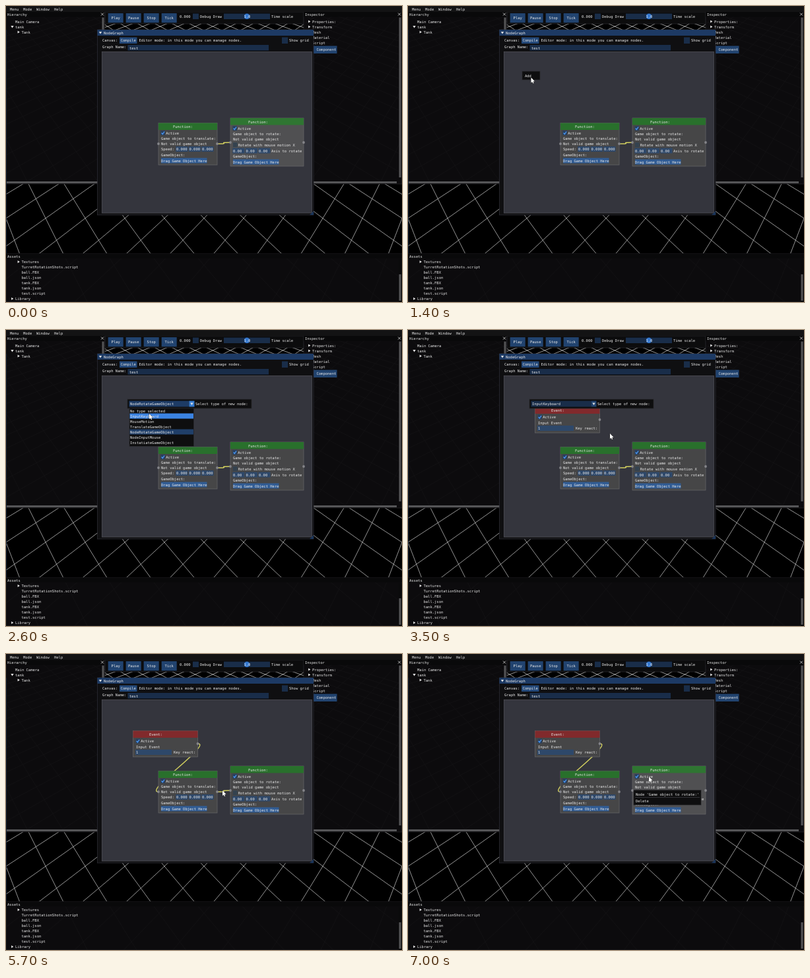
Write an HTML page with a canvas that moves like this. It is 600x449 px and loops after 7100 ms.

```html
<!DOCTYPE html>
<html lang="en">
<head>
<meta charset="utf-8">
<title>Node graph editor</title>
<style>
  html, body { margin: 0; width: 100%; height: 100%; overflow: hidden; background: #000; }
  canvas { display: block; width: 600px; height: 449px; }
</style>
</head>
<body>
<canvas id="stage"></canvas>
<script>
const W = 600, H = 449, LOOP = 7100, STEP = 100;
const BLUE = '#21436f', FIELD = '#192d49', LINK = '#d2d05f', SCROLL = '#555557';
const canvas = document.getElementById('stage');
const dpr = window.devicePixelRatio || 1;
canvas.width = W * dpr;
canvas.height = H * dpr;
const screen = canvas.getContext('2d');
let ctx = screen;

function box(x1, y1, x2, y2, fill, edge) {
  ctx.fillStyle = fill;
  ctx.fillRect(x1, y1, x2 - x1, y2 - y1);
  if (edge) {
    ctx.strokeStyle = edge;
    ctx.lineWidth = 0.7;
    ctx.strokeRect(x1, y1, x2 - x1, y2 - y1);
  }
}

// y is the vertical middle of the capitals
function text(str, x, y, color = '#e8e8e8') {
  ctx.fillStyle = color;
  ctx.fillText(str, x, y + 2);
}

function poly(points, fill) {
  ctx.beginPath();
  for (const [x, y] of points) ctx.lineTo(x, y);
  ctx.closePath();
  ctx.fillStyle = fill;
  ctx.fill();
}

function stroke(points, color, width) {
  ctx.beginPath();
  for (const [x, y] of points) ctx.lineTo(x, y);
  ctx.strokeStyle = color;
  ctx.lineWidth = width;
  ctx.stroke();
}

function disc(x, y, r, fill) {
  ctx.beginPath();
  ctx.arc(x, y, r, 0, 2 * Math.PI);
  ctx.fillStyle = fill;
  ctx.fill();
}

const arrowRight = (x, y) => poly([[x - 1.4, y - 2], [x + 1.9, y], [x - 1.4, y + 2]], '#e4e4e4');
const arrowDown = (x, y) => poly([[x - 2.2, y - 1.5], [x + 2.2, y - 1.5], [x, y + 2]], '#e4e4e4');

function tree(x, y, label, arrow) {
  if (arrow) arrow(x - 4.5, y);
  text(label, x, y);
}

function cross(x, y) {
  stroke([[x - 2, y - 2], [x + 2, y + 2]], '#ddd', 0.8);
  stroke([[x - 2, y + 2], [x + 2, y - 2]], '#ddd', 0.8);
}

function button(x1, y1, x2, y2, label, tx, fill = BLUE) {
  box(x1, y1, x2, y2, fill);
  text(label, tx, (y1 + y2) / 2);
}

function checkbox(x, y, label, on) {
  box(x, y - 3.5, x + 6.5, y + 3.5, on ? '#29405f' : '#34424f');
  if (on) stroke([[x + 1.2, y], [x + 2.8, y + 1.9], [x + 5.5, y - 2]], '#4c9dff', 1.2);
  text(label, x + 7.7, y);
}

// Floor lines meet at one vanishing point per family
function floor() {
  const vy = -200, base = 322;
  ctx.beginPath();
  for (const vx of [-200, 800]) {
    for (let k = -20; k <= 20; k++) {
      const dx = 300 + k * 60 - vx, dy = base - vy;
      ctx.moveTo(vx, vy);
      ctx.lineTo(vx + dx * 2, vy + dy * 2);
    }
  }
  ctx.strokeStyle = '#c4c4c4';
  ctx.lineWidth = 0.75;
  ctx.stroke();
}

function panel(x1, y1, x2, y2, title) {
  box(x1, y1, x2, y2, 'rgba(13,12,14,.965)', '#252529');
  box(x1, y1, x2, y1 + 7.5, '#09090a');
  text(title, x1 + 2, y1 + 4);
}

function editor() {
  box(0, 0, W, H, '#000');
  floor();

  panel(0, 9, 149.5, 270, 'Hierarchy');
  cross(146, 12.5);
  box(145.5, 17.5, 148.5, 260, SCROLL);
  box(1, 266, 141, 269, SCROLL);
  tree(14, 23.5, 'Main Camera');
  tree(14, 31.5, 'tank', arrowDown);
  tree(23.5, 39.5, 'Tank', arrowRight);

  box(150, 9, 451, 27, '#0c0c0d', '#2a2a2e');
  ['Play', 'Pause', 'Stop', 'Tick'].forEach((label, i) => {
    const x = 154.7 + i * 27;
    button(x, 11, x + 23, 25.3, label, x + 11.5 - label.length * 1.655);
  });
  text('0.000', 263, 16);
  box(283, 11.5, 292, 20, FIELD);
  text('Debug Draw', 294, 16);
  box(330, 11.5, 400, 20, FIELD);
  disc(365, 15.8, 4.2, '#3478cf');
  text('1.0', 360.5, 16);
  text('Time scale', 402, 16);

  panel(451, 9, W, 270, 'Inspector');
  cross(596, 12.5);
  box(595.5, 17.5, 598.5, 260, SCROLL);
  box(453, 266, 592, 269, SCROLL);
  ['Properties:', 'Transform', 'Mesh', 'Material', 'Script'].forEach((label, i) =>
    tree(464, 23.5 + i * 8, label, arrowRight));
  button(455, 60.5, 501.5, 72, 'Component', 470.5);

  panel(0, 375.5, W, H, 'Assets');
  tree(23.5, 388, 'Textures', arrowRight);
  ['TurretRotationShots.script', 'ball.FBX', 'ball.json', 'tank.FBX', 'tank.json', 'test.script']
    .forEach((label, i) => tree(23.5, 396 + i * 8, label));
  tree(14, 444, 'Library', arrowRight);
  box(595, 384, W, H, '#0a0a0b');
  box(595.5, 407, 598.5, 447, SCROLL);

  box(0, 0, W, 9, '#131314');
  [['Menu', 6], ['Mode', 26], ['Window', 46], ['Help', 73]].forEach(([s, x]) => text(s, x, 4.5));
  box(0, 36, 0.8, 375, '#13233a');

  // Node graph window
  box(138.5, 36, 466, 317, '#0f0f11', '#303038');
  box(138.5, 36, 466, 45, '#1d3a64');
  arrowDown(143, 40.5);
  text('NodeGraph', 148, 40.5);
  text('Canvas:', 146, 51.5);
  button(172, 47.5, 198.5, 57, 'Compile', 173.7, '#24497a');
  text('Editor mode: in this mode you can manage nodes.', 201.5, 52);
  box(418, 47.5, 427, 57, FIELD);
  text('Show grid', 429, 52);
  text('Graph Name:', 146, 62);
  box(184.5, 59, 398, 67.5, FIELD);
  text('test', 187, 63.5);
  box(145.5, 69.5, 463.5, 314, '#34353d', '#56565f');
  poly([[466, 311], [466, 317], [460, 317]], '#1a355a');
}

function link(x1, y1, x2, y2) {
  const bend = 23;
  ctx.beginPath();
  ctx.moveTo(x1, y1);
  ctx.bezierCurveTo(x1 + bend, y1, x2 - bend, y2, x2, y2);
  ctx.strokeStyle = LINK;
  ctx.lineWidth = 1.4;
  ctx.stroke();
}

const pin = (x, y) => disc(x, y, 1.9, '#85858a');

function node(x1, y1, x2, y2, title, tx, head, fill) {
  box(x1, y1, x2, y2, fill, '#67676a');
  box(x1, y1, x2, y1 + 10.5, head);
  text(title, tx, y1 + 5.5);
}

function target(x, y) {
  text('GameObject:', x, y - 8.5);
  button(x, y - 4, x + 69.5, y + 4, 'Drag Game Object Here', x, '#315c94');
}

function fields(xs, y, value, width) {
  for (const x of xs) {
    box(x - 0.7, y - 4, x + width, y + 4, '#2e486a');
    text(value, x, y);
  }
}

function translateNode() {
  node(231, 177.5, 320, 241, 'Function:', 253, '#29702c', '#464647');
  checkbox(234.5, 192.5, 'Active', true);
  text('Game object to translate:', 235, 201);
  text('Not valid game object', 235, 209);
  text('Speed:', 235, 217);
  fields([258, 277.5, 297], 217, '0.000', 17.5);
  target(235, 234.5);
  pin(231, 209);
  pin(320, 209);
}

function rotateNode(hover) {
  node(340, 170, 451, 243, 'Function:', 367, hover ? '#2f7532' : '#29702c', hover ? '#505052' : '#464647');
  checkbox(343.5, 185.5, 'Active', true);
  text('Game object to rotate:', 344, 194);
  text('Not valid game object', 344, 202);
  checkbox(344, 210.5, 'Rotate with mouse motion X', false);
  fields([344, 363.5, 383], 219.5, '0.00', 17.5);
  text('Axis to rotate', 402, 219.5);
  target(344, 236.5);
  pin(340, 207);
  pin(451, 207);
}

function eventNode(hover) {
  node(192.5, 116.5, 290.5, 156, 'Event:', 217, hover ? '#923235' : '#812a2c', '#464647');
  checkbox(196.5, 132, 'Active', true);
  text('Input Event', 197, 140.5);
  box(196, 145, 251, 153, '#2e486a');
  text('1', 197, 149);
  text('Key react:', 254, 149);
  pin(290.5, 136);
}

const popup = (x1, y1, x2, y2) => box(x1, y1, x2, y2, '#0e0e0f', '#2b2b2f');

function typePopup(type, open) {
  popup(184, 105, 372, 119);
  box(186.5, 107.5, 277.5, 116.5, open ? '#1d3b65' : FIELD);
  text(type, 188, 112);
  box(277.5, 107.5, 285.5, 116.5, open ? '#357bd0' : BLUE);
  arrowDown(281.5, 112);
  text('Select type of new node:', 287, 112);
}

const TYPES = ['No type selected', 'InputKeyboard', 'MouseMotion', 'TranslateGameObject',
  'NodeRotateGameObject', 'NodeInputMouse', 'InstatiateGameObject'];

function typeList(my) {
  popup(187, 118.5, 284.5, 176.5);
  TYPES.forEach((label, i) => {
    const y = 122.5 + i * 8;
    const hover = my >= y - 4 && my < y + 4;
    if (hover || i === 4) box(187.5, y - 4, 284, y + 4, hover ? '#3b83e2' : '#203f69');
    text(label, 188, y);
  });
}

function nodeMenu() {
  popup(342, 206.5, 444, 229);
  text("Node 'Game object to rotate:'", 345, 212.5);
  stroke([[344, 217.5], [442, 217.5]], '#3c3c42', 0.8);
  text('Delete', 345, 222.5);
}

// time, x, y of the pointer tip
const PATH = [
  [900, 300, 125], [1150, 173, 99], [1250, 173, 99], [1400, 186.5, 108.5], [1700, 185, 106],
  [1900, 185, 106], [2100, 279, 112], [2300, 279, 112], [2600, 217, 127], [2900, 217, 129],
  [3400, 306, 157], [3700, 306, 157], [4300, 290.5, 136.5], [4600, 290.5, 136.5], [5100, 231, 209],
  [5300, 231, 209], [5700, 328, 207], [6000, 328, 207], [6300, 342, 207], [6500, 342, 207],
  [6900, 365, 186], [7100, 365, 186]
];

function pointerAt(t) {
  const i = PATH.findIndex(p => p[0] > t);
  if (i < 1) return null;
  const [t0, x0, y0] = PATH[i - 1], [t1, x1, y1] = PATH[i];
  const u = (t - t0) / (t1 - t0), e = u * u * (3 - 2 * u);
  return { x: x0 + (x1 - x0) * e, y: y0 + (y1 - y0) * e };
}

function pointer({ x, y }) {
  const shape = [[0, 0], [0, 8], [1.8, 6.4], [3, 9], [4.2, 8.4], [3.1, 6], [5.5, 5.8]];
  const points = shape.map(([dx, dy]) => [x + dx, y + dy]);
  stroke([...points, points[0]], '#222', 0.8);
  poly(points, '#fff');
}

function prepare(target) {
  target.setTransform(dpr, 0, 0, dpr, 0, 0);
  target.font = '5.5px "DejaVu Sans Mono", monospace';
  target.textRendering = 'geometricPrecision';
}

// The editor behind the nodes never changes
const backdrop = document.createElement('canvas');
backdrop.width = canvas.width;
backdrop.height = canvas.height;
ctx = backdrop.getContext('2d');
prepare(ctx);
editor();
ctx = screen;
prepare(ctx);

function draw(t) {
  const during = (a, b) => t >= a && t < b;
  const mouse = pointerAt(t);
  ctx.drawImage(backdrop, 0, 0, W, H);

  if (t < 6000) link(320, 209, 340, 207);
  if (during(4700, 5200)) link(290.5, 136, mouse.x, mouse.y);
  if (t >= 5200) link(290.5, 136, 231, 209);

  if (t >= 2900) eventNode(during(4200, 4700));
  translateNode();
  rotateNode(t < 900 || t >= 6300);

  if (during(1200, 1800)) {
    popup(173, 99, 200, 112);
    text('Add', 177, 105.5);
  }
  if (during(1800, 3700)) typePopup(t < 2900 ? TYPES[4] : TYPES[1], during(2200, 2900));
  if (during(2200, 2900)) typeList(mouse.y);
  if (t >= 6500) nodeMenu();
  if (mouse) pointer(mouse);
}

const start = performance.now();
function tick() {
  const t = (performance.now() - start) % LOOP;
  draw(Math.floor(t / STEP) * STEP);
  requestAnimationFrame(tick);
}
tick();
</script>
</body>
</html>
```
